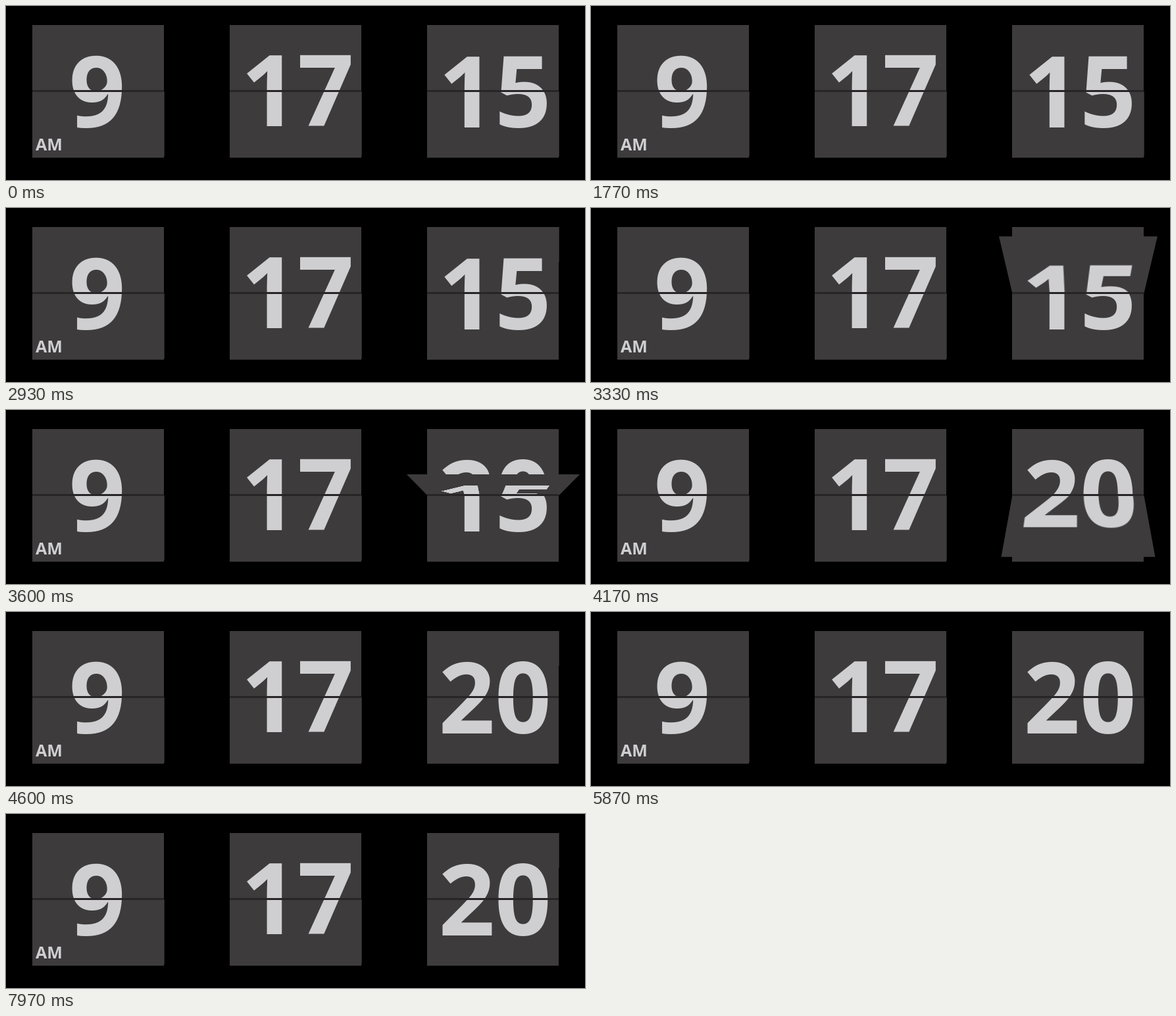
Animation of 880x265 px, one loop 8000 ms. Source, as an HTML page:

```html
<!DOCTYPE html>
<html lang="en">
<head>
<meta charset="utf-8">
<title>Flip clock</title>
<style>
  html, body { margin: 0; width: 100%; height: 100%; overflow: hidden; background: #000; }
  .card { position: absolute; top: 29px; width: 200px; height: 202px; perspective: 400px; perspective-origin: 50% 101px; }
  .card > * { position: absolute; left: 0; }
  svg { display: block; width: 200px; overflow: hidden; background: #3d3b3c; }
  text { font: 700 150px "Open Sans", "Noto Sans", sans-serif; fill: #cfcfd1; }
  .small { font-size: 25px; }
  .top { top: 0; height: 101px; }
  .bottom { top: 101px; height: 101px; }
  .flap { height: 99px; visibility: hidden; }
  .flap.top { top: 2px; transform-origin: 50% 100%; }
  .flap.bottom { transform-origin: 50% 0; }
  .rim { left: 200px; width: 1px; background: #3d3b3c; opacity: .7; }
  .line { top: 98.5px; width: 200px; height: 3.5px; background: #272526; }
</style>
</head>
<body>
<script>
const LOOP = 8000, PERIOD = 5000, RESET = 2930, START = 2970, DURATION = 1500;

// One half of a card; the y offset is where its box begins inside the card.
function half(kind, offset, label, x, baseline, extra = '') {
  return `<svg class="${kind}"><g transform="translate(0 ${-offset})">` +
    `<text x="${x}" y="${baseline}">${label}</text>${extra}</g></svg>`;
}

function addCard(left, label, x, baseline, extra, flaps = '') {
  const card = document.createElement('div');
  card.className = 'card';
  card.style.left = left + 'px';
  card.innerHTML = half('top', 0, label, x, baseline) +
    half('bottom', 101, label, x, baseline, extra) + flaps +
    '<div class="rim" style="top:101px;height:99px"></div><div class="line"></div>';
  document.body.append(card);
  return card;
}

addCard(40, '9', 55.7, 156, '<text class="small" x="5" y="191">AM</text>');
addCard(340, '17', 17.3, 154);
const seconds = addCard(640, '15', 17.5, 156, '',
  half('flap top', 2, '15', 17.5, 156) + half('flap bottom', 101, '20', 17.5, 156));

const find = selector => seconds.querySelector(selector);
const topText = find('.top text'), bottomText = find('.bottom text');
const front = find('.flap.top'), back = find('.flap.bottom'), rim = find('.rim');

function pose(flap, angle, visible) {
  flap.style.visibility = visible ? 'visible' : 'hidden';
  flap.style.transform = `translateX(.4px) rotateX(${angle}deg)`;
}

function frame() {
  const t = performance.now() % LOOP;
  const angle = Math.min(180, Math.max(0, (t - START) / DURATION * 180));
  const flipping = angle > 0 && angle < 180;
  const raised = t % PERIOD >= RESET;

  topText.textContent = angle > 0 ? '20' : '15';
  bottomText.textContent = angle < 180 ? '15' : '20';
  pose(front, -angle, flipping && angle < 90);
  pose(back, 180 - angle, flipping && angle >= 90);

  rim.style.visibility = flipping ? 'hidden' : 'visible';
  rim.style.top = raised ? '0' : '101px';
  rim.style.height = raised ? '53px' : '99px';
  requestAnimationFrame(frame);
}
frame();
</script>
</body>
</html>
```
